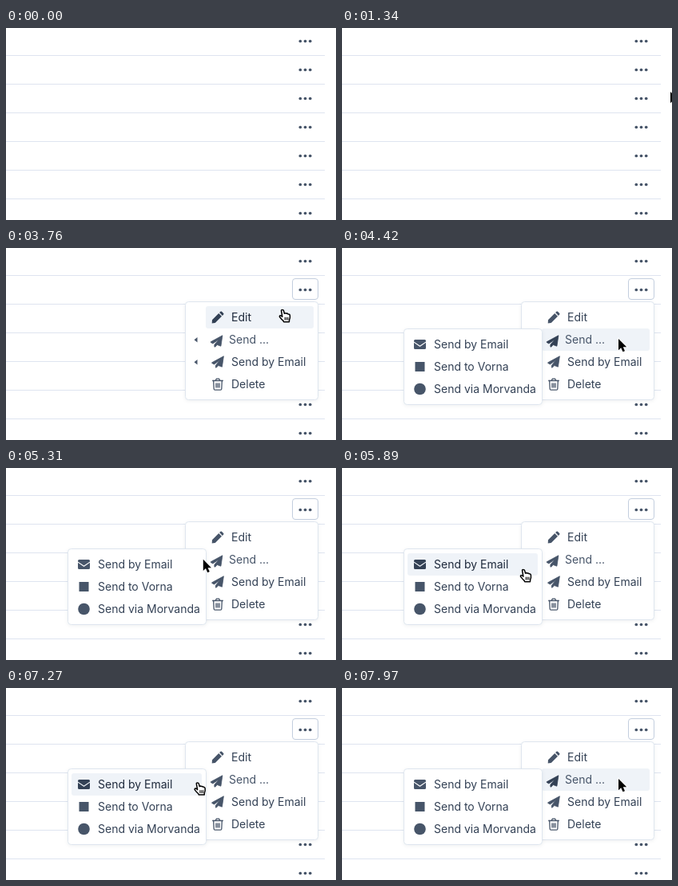
An HTML page that plays this animation: 413x241 px, repeating every 8 s.

```html
<!DOCTYPE html>
<html lang="en">
<head>
<meta charset="utf-8">
<title>Row menu</title>
<style>
  html, body { margin: 0; width: 100%; height: 100%; overflow: hidden; background: #fff; }
  svg { display: block; width: 413px; height: 241px; }
  text { font: 14px Inter, "Liberation Sans", sans-serif; fill: #334155; }
  .item > rect { fill: none; }
  .item .icon { fill: #475569; stroke: #475569; stroke-linejoin: round; }
  .item .muted { fill: #475569; }
  .on > rect { fill: #eff3f8; }
  .on text { fill: #1e293b; }
  .on .icon { fill: #334155; stroke: #334155; }
  .panel { fill: #fff; stroke: #dfe6ef; filter: drop-shadow(0 1px 2px rgba(15, 23, 42, .07)); }
</style>
</head>
<body>
<svg viewBox="0 0 413 241">
  <g id="rows"></g>
  <rect id="button" x="358.5" y="38.5" width="32" height="26" rx="3.5" fill="none"/>
  <g id="menu">
    <rect class="panel" x="224.5" y="67.5" width="166" height="123" rx="4"/>
    <path d="M239.5 112v6.4l-4-3.2zM239.5 140v6.4l-4-3.2z" fill="#475569"/>
  </g>
  <g id="submenu">
    <rect class="panel" x="77.5" y="101.5" width="173" height="95" rx="4"/>
  </g>
  <path id="arrow" d="M0 0V14.2L3.2 11.2 5.5 16.3 8 15.2 5.8 10.3H10.2Z"
    fill="#000" stroke="#fff" paint-order="stroke" stroke-width="1.6"/>
  <g id="hand" stroke="#000" stroke-linejoin="round" stroke-linecap="round">
    <path d="M-1.4 2Q-1.8.2 0 .3 1.2.3 1.6 1.8L2.4 5Q3.5 4 4.8 5 6 4.4 7 5.7 9.3 5.5 9.4 8 9.7 11 8.6 13L8.4 15.5H1.6L1 14.2Q-1.5 12-3.5 9.3-4 7.6-2.6 7.5-1 7.8-.2 9Z"
      fill="#fff" stroke-width="1.5"/>
    <path d="M3.1 10v3M5 10v3M6.9 10v3" fill="none"/>
  </g>
</svg>
<script>
const LOOP = 8000, MOVE = 800;
const OPEN = 2530, APPEAR = 1340;
const $ = id => document.getElementById(id);
const add = (parent, markup) => parent.insertAdjacentHTML('beforeend', markup);

// Icons are drawn in a 16 x 16 box
const icons = {
  pencil: '<path d="M1 11.2 9.2 3 13 6.8 4.8 15 .7 15.4zM10.1 2.1 11.4.8Q12.2.1 13 .8L15.2 3Q15.9 3.8 15.2 4.6L13.9 5.9z" stroke="none"/>',
  plane: '<path d="M15.4.8 13.4 14.2 8.8 12.5 6.1 15.3 5.4 15V12.3L10.9 5.8 3.4 11 .7 9.4V8.8z" stroke-width=".8"/>',
  trash: '<path d="M1.2 3.5H14.8M5.3 3.3 6.3 1.2H9.7L10.7 3.3M2.7 3.7 3.2 14Q3.3 15.2 4.5 15.2H11.5Q12.7 15.2 12.8 14L13.3 3.7M6 6.5v6M8 6.5v6M10 6.5v6" fill="none" stroke-width="1.3"/>',
  mail: '<path d="M0 4.4V3.5Q0 2 1.5 2H13.5Q15 2 15 3.5V4.4L7.5 9.6zM0 5.8 7.5 11 15 5.8V12.5Q15 14 13.5 14H1.5Q0 14 0 12.5z" stroke="none"/>',
  square: '<rect x="1.5" y="2" width="12" height="12" stroke="none"/>',
  disc: '<circle cx="7.5" cy="8" r="7.3" stroke="none"/>'
};

for (let y = 16.5; y < 241; y += 36) {
  add($('rows'), `<path d="M0 ${y + 18}H399" stroke="#dee4f0"/>` +
    [-6.2, 0, 6.2].map(d => `<circle cx="${374.5 + d}" cy="${y}" r="1.85" fill="#475569"/>`).join(''));
}

function addItem(parent, x, width, y, icon, label, muted) {
  const [iconX, textX] = parent.id === 'menu' ? [257, 282] : [90, 115];
  const dx = muted ? -3 : 0, dy = muted ? 2 : 0;
  add(parent, `<g class="item">
    <rect x="${x}" y="${y - 14}" width="${width}" height="28" rx="3"/>
    <g class="icon" transform="translate(${iconX + dx / 2} ${y - 8 + dy})">${icons[icon]}</g>
    <text class="${muted ? 'muted' : ''}" x="${textX + dx}" y="${y + 5}">${label}</text></g>`);
  return { node: parent.lastElementChild, x, y: y - 14, width, sub: parent.id === 'submenu', muted };
}

const main = (...rest) => addItem($('menu'), 250, 135, ...rest);
const sub = (...rest) => addItem($('submenu'), 82, 163, ...rest);
const edit = main(87, 'pencil', 'Edit');
const items = [
  edit,
  main(115, 'plane', 'Send ...', true),
  main(143, 'plane', 'Send by Email'),
  main(171, 'trash', 'Delete'),
  sub(121, 'mail', 'Send by Email'),
  sub(149, 'square', 'Send to Vorna'),
  sub(177, 'disc', 'Send via Morvanda')
];

// Pointer moves: start time, end x, end y
const moves = [
  [1310, 376, 52], [2860, 346, 77], [3670, 346, 114], [4780, 229, 115],
  [5600, 219, 178], [6580, 240, 118], [7400, 357, 113.6]
];
const ease = p => p < .5 ? 4 * p ** 3 : 1 - 4 * (1 - p) ** 3;

function pointerAt(t) {
  let x = 411, y = 80;
  for (const [start, endX, endY] of moves) {
    const k = ease(Math.min(1, Math.max(0, (t - start) / MOVE)));
    x += (endX - x) * k;
    y += (endY - y) * k;
  }
  return [x, y];
}

const inside = (x, y, left, top, width, height) =>
  x >= left && x < left + width && y >= top && y < top + height;
const show = (node, visible) => node.style.display = visible ? '' : 'none';
const enterSubmenu = (() => {
  let t = 3670;
  while (pointerAt(t)[1] < 101) t += 5;
  return t;
})();

function draw(t) {
  const [x, y] = pointerAt(t);
  const open = t >= OPEN, subOpen = t >= enterSubmenu;
  const onButton = t >= APPEAR && inside(x, y, 358, 38, 33, 27);
  const focused = t >= APPEAR && (onButton || open);
  $('button').setAttribute('stroke', onButton ? '#91a2c0' : focused ? '#c3cede' : 'none');
  show($('menu'), open);
  show($('submenu'), subOpen);

  const overSub = subOpen && inside(x, y, 77, 101, 174, 96);
  const hit = open && items.find(i => i.sub === overSub && inside(x, y, i.x, i.y, i.width, 28));
  // The first item keeps the focus until another one is entered
  const active = hit || (open && !subOpen && edit);
  for (const i of items) i.node.classList.toggle('on', i === active);

  const useHand = onButton || (hit && !hit.muted);
  const press = t >= 2170 && t < 2290 ? 1.2 : 1;
  show($('arrow'), t >= APPEAR && !useHand);
  show($('hand'), t >= APPEAR && useHand);
  $('arrow').setAttribute('transform', `translate(${x} ${y})`);
  $('hand').setAttribute('transform', `translate(${x + 3} ${y + 8}) scale(${press}) translate(-3 -8)`);
}

const begin = performance.now();
function tick() {
  draw((performance.now() - begin) % LOOP);
  requestAnimationFrame(tick);
}
tick();
</script>
</body>
</html>
```
